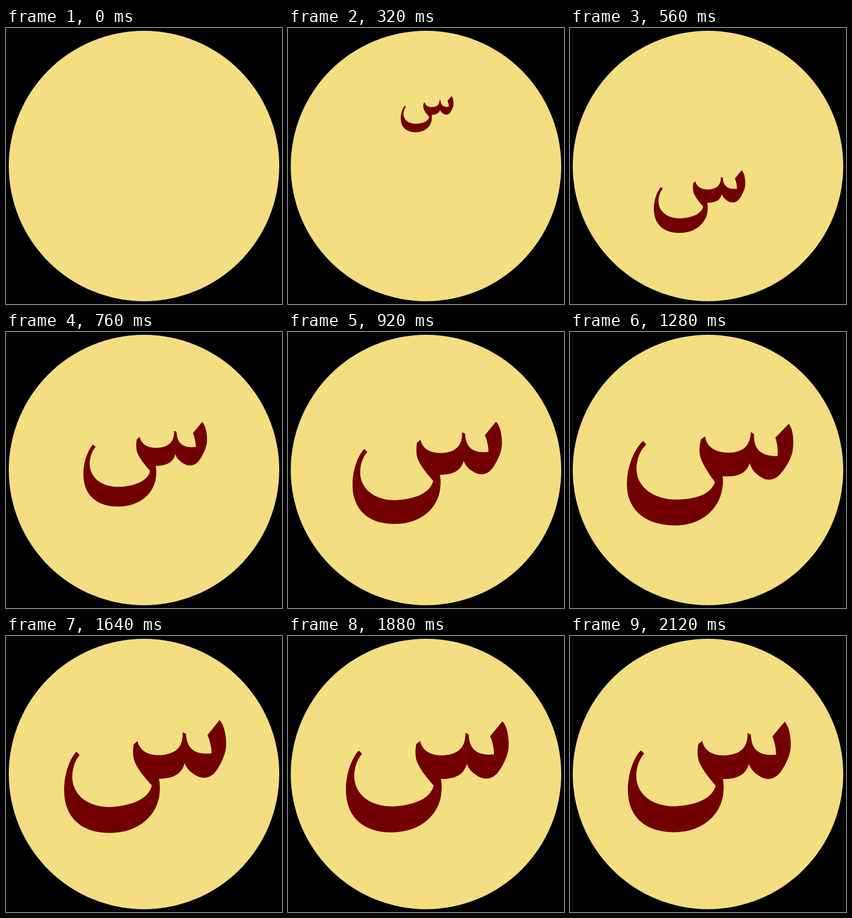
An HTML page for the animation above (2.8 s loop, 500 by 500 pixels).

```html
<!DOCTYPE html>
<html lang="ar">
<head>
<meta charset="utf-8">
<title>Letter sin</title>
<style>
  html, body { margin: 0; width: 100%; height: 100%; overflow: hidden; background: #000; }
  svg { display: block; width: 100vw; height: 100vh; }
</style>
</head>
<body>
<svg viewBox="0 0 500 500" role="img" aria-label="س">
  <circle cx="250" cy="250" r="245" fill="#f3df82"/>
  <path id="letter" fill="#720000" visibility="hidden" d="M388 154
    C398 164 401 190 399 205 C397 219 388 237 380 247
    C368 262 352 260 340 251 C331 245 326 238 324 231
    C319 250 305 259 277 259 C279 268 279 275 278 284
    C275 322 242 356 188 356 C131 356 105 323 105 279
    C105 250 115 222 128 208 L134 214
    C124 226 120 240 120 256 C122 291 153 310 192 309
    C232 306 258 294 264 271 C250 255 236 238 232 223
    C230 212 231 202 232 196 L239 190
    C243 208 258 217 282 216 C308 214 322 202 321 175 L327 178
    C328 205 342 217 373 214 C373 203 370 190 366 181 Z"/>
</svg>
<script>
  const LOOP = 2800, STEP = 40;
  const CENTER = { x: 252, y: 255 };
  const SWINGS = [988, 1628], SWING_TIME = 500;
  const SWING_KEYS = [0, -10, 10, 0];
  const letter = document.getElementById('letter');

  // Clockwise spiral that closes in on the centre.
  function spiral(t) {
    const radius = 117 * Math.max(0, 1 - (t / 816) ** 2);
    const turn = (t - 320) / 440 * 2 * Math.PI;
    return { x: radius * Math.sin(turn), y: -radius * Math.cos(turn) };
  }

  function swing(t) {
    const start = SWINGS.find(s => t >= s && t < s + SWING_TIME);
    if (start === undefined) return 0;
    const pos = (t - start) / SWING_TIME * (SWING_KEYS.length - 1);
    const i = Math.floor(pos);
    return SWING_KEYS[i] + (SWING_KEYS[i + 1] - SWING_KEYS[i]) * (pos - i);
  }

  function draw(t) {
    const scale = Math.min(1, (t + 8) / 1010);
    const offset = spiral(t);
    letter.setAttribute('visibility', t < STEP ? 'hidden' : 'visible');
    letter.setAttribute('transform',
      `translate(${CENTER.x + offset.x} ${CENTER.y + offset.y}) ` +
      `rotate(${swing(t)}) scale(${scale}) translate(${-CENTER.x} ${-CENTER.y})`);
  }

  const begin = performance.now();
  function tick() {
    const t = (performance.now() - begin) % LOOP;
    draw(Math.floor(t / STEP) * STEP);
    requestAnimationFrame(tick);
  }
  tick();
</script>
</body>
</html>
```
